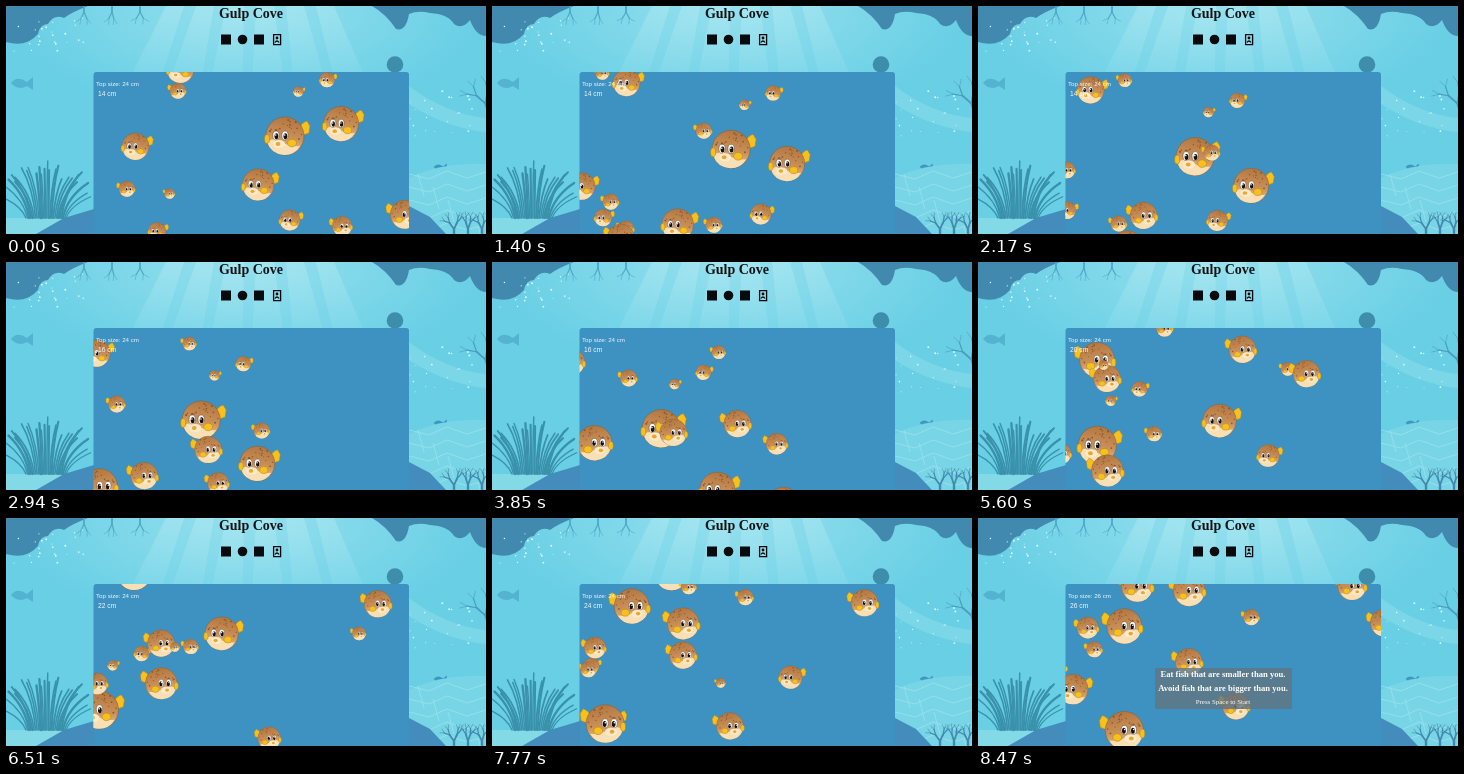
These frames come from a looping animation (480 by 228 pixels, 8.54 s). An HTML page:

```html
<!DOCTYPE html>
<html lang="en">
<head>
<meta charset="utf-8">
<title>Gulp Cove</title>
<style>
  html, body { margin: 0; width: 100%; height: 100%; overflow: hidden; background: #68cfe5; }
  svg { display: block; width: 480px; height: 228px; }
  .serif { font-family: "Liberation Serif", "Times New Roman", serif; text-anchor: middle; }
  .bold { font-weight: bold; }
  .score { font-family: "Liberation Sans", Arial, sans-serif; fill: #eef8fc; }
  .branch { fill: none; stroke-linecap: round; }
</style>
</head>
<body>
<svg viewBox="0 0 480 228" xmlns="http://www.w3.org/2000/svg">
  <defs>
    <radialGradient id="glow" cx=".5" cy="0" r=".5">
      <stop offset="0" stop-color="#b4ebf3" stop-opacity=".6"/>
      <stop offset="1" stop-color="#b4ebf3" stop-opacity="0"/>
    </radialGradient>
    <linearGradient id="ray" x1="0" y1="0" x2="0" y2="1">
      <stop offset="0" stop-color="#d8f7fa" stop-opacity=".25"/>
      <stop offset="1" stop-color="#d8f7fa" stop-opacity="0"/>
    </linearGradient>
    <linearGradient id="skin" x1=".6" y1="0" x2=".4" y2="1">
      <stop offset="0" stop-color="#b27640"/>
      <stop offset=".5" stop-color="#c98f57"/>
      <stop offset="1" stop-color="#efcf9f"/>
    </linearGradient>
    <clipPath id="tank"><rect x="87.500" y="66" width="315.500" height="180" rx="3"/></clipPath>

    <!-- faces left, 48 units wide -->
    <g id="fish">
      <path d="M11-4Q15-12 20-13L23-8L22-1Q17 2 12 0z" fill="#f7c11d" stroke="#b8801f" stroke-width=".6"/>
      <circle cx="-2" cy="2" r="19" fill="url(#skin)" stroke="#8a6038" stroke-width=".6"/>
      <path d="M-20 8Q-12 2-4 9Q4 13 13 12Q8 21-3 21Q-16 20-20 8z" fill="#f8dfb6"/>
      <g id="spots" fill="#8d5a2e"></g>
      <ellipse cx="-20" cy="5" rx="2.500" ry="4.500" fill="#f7c11d" stroke="#b8801f" stroke-width=".6"/>
      <ellipse cx="5" cy="9" rx="4.500" ry="3.800" fill="#f7c11d" stroke="#b8801f" stroke-width=".6"/>
      <g id="eyes"></g>
      <ellipse cx="-8" cy="10" rx="6" ry="4" fill="#fcebcb"/>
      <ellipse cx="-9" cy="10" rx="2.400" ry="2" fill="#efa52c"/>
    </g>
    <path id="minnow" d="M-9 0Q-3-8 7-1L13-6V7L7 3Q-2 8-9 0z"/>
  </defs>

  <rect width="480" height="228" fill="#68cfe5"/>
  <rect width="480" height="228" fill="url(#glow)"/>
  <g id="rays" fill="url(#ray)"></g>
  <path d="M403 80Q440 108 480 112V126Q440 122 403 98z" fill="#8edfec" opacity=".5"/>

  <!-- reef overhang -->
  <g fill="#4289af">
    <path d="M0 0H82Q66 6 58 12Q48 8 42 18Q34 18 32 28Q20 42 0 36z"/>
    <path d="M366 0H480V30Q470 30 464 14Q456 24 448 18Q442 8 424 7Q412 4 403 8Q400 26 390 23Q380 8 366 0z"/>
  </g>
  <circle cx="389" cy="58.500" r="8.300" fill="#3d8dab"/>
  <g fill="#53b3d0">
    <use href="#minnow" transform="translate(14 77)"/>
    <use href="#minnow" transform="translate(433 161) scale(.6)" fill="#3f97c0"/>
  </g>

  <!-- sea floor -->
  <path d="M403 172Q436 156 480 158V228H403z" fill="#78d5e5"/>
  <path d="M0 212H88V228H0z" fill="#83d9e6"/>
  <g id="tiles" fill="none" stroke="#a8e6ef" opacity=".6"></g>
  <path d="M30 228L58 212L88 203V228z" fill="#438cbc"/>
  <path d="M403 200L424 211L440 228H403z" fill="#438cbc"/>
  <g id="weeds" class="branch" stroke="#3a91aa"></g>
  <g id="corals" class="branch"></g>
  <g id="bubbles" fill="#e0f8fa"></g>

  <!-- heading -->
  <text class="serif bold" x="245" y="12" font-size="14" fill="#101416">Gulp Cove</text>
  <g fill="#080b0d">
    <rect x="215" y="28.500" width="10" height="10"/>
    <circle cx="236.500" cy="33.500" r="4.800"/>
    <rect x="248" y="28.500" width="10" height="10"/>
    <circle cx="271" cy="32" r="1.400"/>
  </g>
  <path d="M267.600 28.600h7v10h-7zM269 36.500q2-3 4 0" fill="none" stroke="#080b0d" stroke-width="1.300"/>

  <!-- game -->
  <g clip-path="url(#tank)">
    <rect x="87" y="66" width="317" height="162" fill="#3d92c1"/>
    <g id="shoal"></g>
  </g>
  <text class="score" id="top" x="90" y="80" font-size="6.200"></text>
  <text class="score" id="size" x="92" y="90" font-size="6.700"></text>
  <g id="notice">
    <rect x="177" y="150" width="137" height="41" fill="#627681" opacity=".8"/>
    <g class="serif" fill="#fff">
      <text class="bold" x="245" y="158.500" font-size="8.600">Eat fish that are smaller than you.</text>
      <text class="bold" x="245" y="172.500" font-size="8.600">Avoid fish that are bigger than you.</text>
      <text x="245" y="186" font-size="6.900">Press Space to Start</text>
    </g>
  </g>
</svg>
<script>
const LOOP = 8540, TICK = 70, SPEED = 9.5 / 1000, GAME_OVER = 8330;
const $ = id => document.getElementById(id);

function add(id, tag, attrs) {
  const node = document.createElementNS("http://www.w3.org/2000/svg", tag);
  for (const key in attrs) node.setAttribute(key, attrs[key]);
  return $(id).appendChild(node);
}

let seed = 7;
const random = () => (seed = seed * 16807 % 2147483647) / 2147483647;
const between = (a, b) => a + random() * (b - a);

// Scenery
function bubbles(x, y, w, h, count) {
  for (let i = 0; i < count; i++)
    add("bubbles", "circle", { cx: between(x, x + w), cy: between(y, y + h), r: between(.4, 1) });
}
bubbles(8, 10, 75, 38, 24);
bubbles(404, 85, 66, 45, 22);

for (let i = 0; i < 6; i++) {
  const x = 160 + i * 30, lean = (x - 240) * .5;
  add("rays", "path", { d: `M${x} 0h18l${lean + 8} 100h-36z` });
}

for (let i = 0; i < 26; i++) {
  const a = i / 12.5 - 1, lift = 58 * Math.sqrt(1 - a * a * .75) * between(.7, 1);
  add("weeds", "path", {
    d: `M${40 + a * 20} 212q${a * 5} ${-lift * .6} ${a * 28 + between(-4, 4)} ${-lift}`,
    "stroke-width": between(1.2, 2.4)
  });
}

for (let i = 0; i < 5; i++) {
  const y = 168 + i * 13;
  add("tiles", "path", { d: `M403 ${y}l20 5l18-8l20 7l19-6M${412 + i * 15} ${y}l6 22` });
}

// A branch that forks in two until it is spent.
function coral(x, y, angle, length, color, depth = 4) {
  if (!depth) return;
  const x2 = x + Math.cos(angle) * length, y2 = y + Math.sin(angle) * length;
  add("corals", "path", { d: `M${x} ${y}L${x2} ${y2}`, stroke: color, "stroke-width": depth * .6 });
  for (const turn of [-.45, .45])
    coral(x2, y2, angle + turn + between(-.2, .2), length * .8, color, depth - 1);
}
const UP = -Math.PI / 2;
for (let i = 0; i < 3; i++) {
  coral(78 + i * 28, -3, -UP, 9, "#4fa9c6", 3);
  coral(448 + i * 14, 232, UP, 9, "#4289af");
}
coral(484, 112, UP - .3, 15, "#4a9dbf");

// Fish features
for (let i = 0; i < 18; i++) {
  const a = between(-2.9, .4), r = between(8, 17);
  add("spots", "circle", { cx: -2 + r * Math.cos(a), cy: 1 + r * Math.sin(a), r: between(.6, 1.2) });
}
for (const x of [-11, -2]) {
  add("eyes", "ellipse", { cx: x, cy: 1.5, rx: 3.2, ry: 4.5, fill: "#fff", stroke: "#5e432d", "stroke-width": .5 });
  add("eyes", "ellipse", { cx: x + .4, cy: 2.3, rx: 1.9, ry: 3, fill: "#15100d" });
  add("eyes", "circle", { cx: x - .3, cy: 1, r: .8, fill: "#fff" });
}

// Schools swim in straight lines; each member has a starting x, y and a width.
const shoal = [];
const newFish = () => add("shoal", "use", { href: "#fish" });

function school(vx, vy, ...members) {
  for (const [x, y, w] of members) shoal.push({ x, y, w, vx, vy, node: newFish() });
}
school(-3, 1, [176, 62, 34], [293, 85, 13], [322, 73, 19], [281, 128, 48]);
school(-3, 3, [131, 139, 34], [337, 116, 44]);
school(-5, 3, [254, 177, 40]);
school(-3, -1, [152, 224, 22]);
school(-3, -5, [403, 423, 42], [338, 572, 38]);
school(1, 3, [120, 182, 20], [64, -135, 44]);
school(1, 5, [163, 187, 13]);
school(1, -3, [28, 350, 27]);
school(1, -5, [64, 362, 44], [122, 437, 19]);
school(3, 1, [397, 207, 36], [-32, 62, 34]);
school(3, 3, [171, 84, 20], [78, 155, 20], [31, -143, 20], [335, 219, 25]);
school(3, 5, [-84, -336, 40], [131, -336, 36]);
school(3, -3, [181, 258, 20], [26, 225, 21], [15, 428, 34], [-126, 372, 20]);
school(3, -5, [-32, 473, 40]);
school(5, 1, [43, 53, 17], [-258, 130, 48]);
school(5, 3, [2, -138, 34], [-141, -57, 12]);
school(5, -3, [61, 270, 34]);
school(5, -5, [-3, 352, 34]);

const swim = (f, t) => [f.x + f.vx * t * SPEED, f.y + f.vy * t * SPEED];

// Player's turning points: time, x, y
const path = [
  [0, 285, 213], [1400, 270, 207], [2940, 211, 220], [3500, 268, 187], [4690, 321, 166],
  [6510, 262, 219], [7770, 300, 158], [GAME_OVER, 262, 185]
];
const player = newFish();
const centimetres = t => 14 + 2 * Math.floor(6.25 * (t / LOOP) ** 1.6);
const playerWidth = t => 22 + centimetres(t) * .3;

function steer(t) {
  const i = path.findIndex(p => p[0] > t);
  const [t0, x0, y0] = path[i - 1], [t1, x1, y1] = path[i];
  const k = (t - t0) / (t1 - t0);
  return [x0 + (x1 - x0) * k, y0 + (y1 - y0) * k, x1 > x0];
}

// A smaller fish is eaten when the player reaches it.
for (const f of shoal) {
  f.eaten = LOOP;
  for (let t = 0; t < GAME_OVER && f.eaten === LOOP; t += TICK) {
    const [px, py] = steer(t), [x, y] = swim(f, t), w = playerWidth(t);
    if (f.w < w - 4 && Math.hypot(px - x, py - y) < (w + f.w) / 3) f.eaten = t;
  }
}

function place(node, x, y, w, right) {
  const s = w / 48;
  node.setAttribute("transform", `translate(${x} ${y}) scale(${right ? -s : s} ${s})`);
}
const show = (node, on) => { node.style.display = on ? "" : "none"; };

function draw(t) {
  for (const f of shoal) {
    place(f.node, ...swim(f, t), f.w, f.vx > 0);
    show(f.node, t < f.eaten);
  }
  const over = t >= GAME_OVER, cm = centimetres(t);
  show(player, !over);
  show($("notice"), over);
  if (!over) {
    const [x, y, right] = steer(t);
    place(player, x, y, playerWidth(t), right);
  }
  $("top").textContent = `Top size: ${Math.max(24, cm)} cm`;
  $("size").textContent = `${cm} cm`;
}

const start = performance.now();
function frame() {
  const t = (performance.now() - start) % LOOP;
  draw(Math.floor(t / TICK) * TICK);
  requestAnimationFrame(frame);
}
frame();
</script>
</body>
</html>
```
